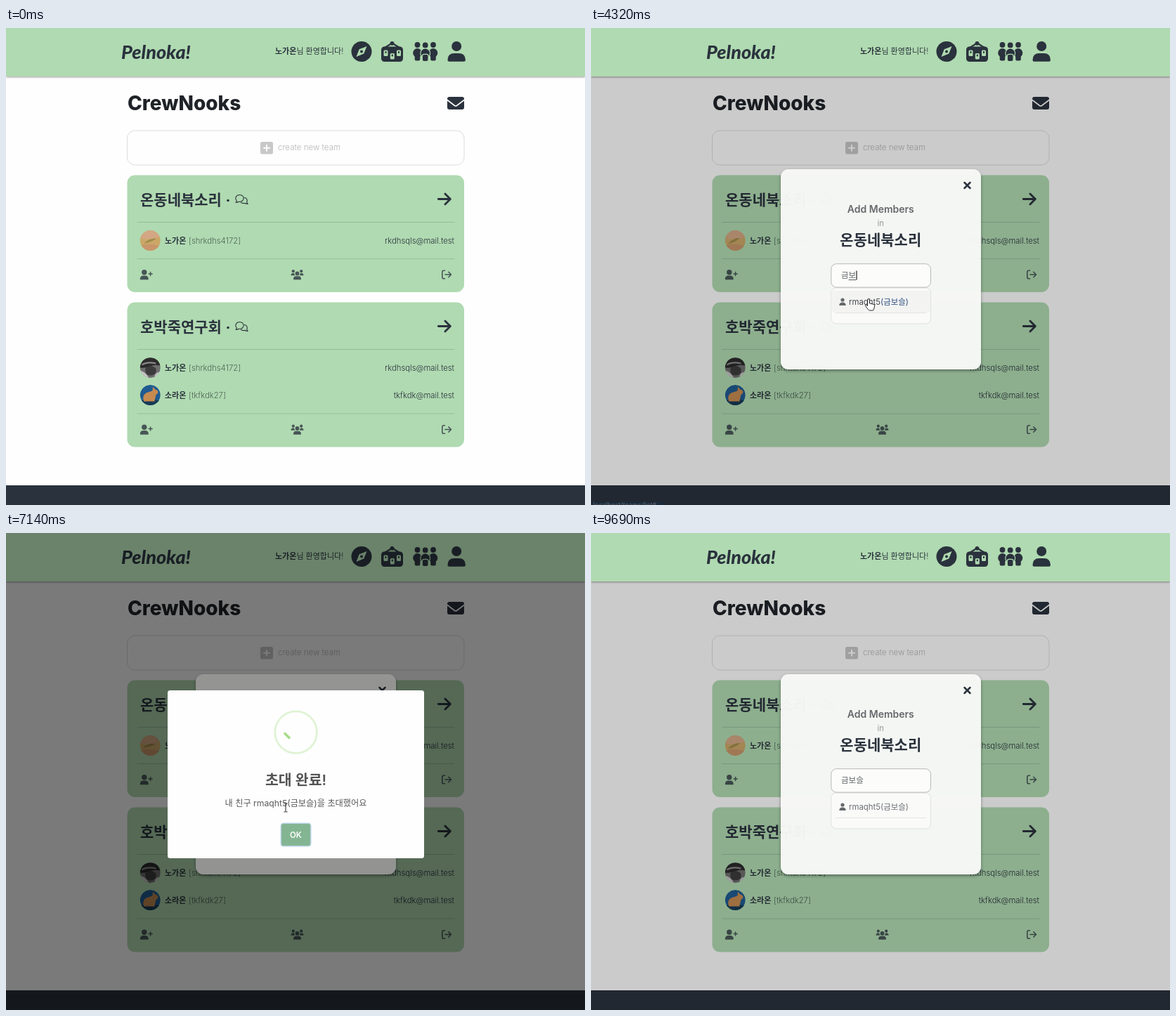
Animation of 824 by 679 pixels, one loop 9.81 s. Source, as an HTML page:

```html
<!DOCTYPE html>
<html lang="ko">
<head>
<meta charset="utf-8">
<style>
  html, body { margin: 0; width: 100%; height: 100%; overflow: hidden; background: #fefefe; }
  svg { display: block; width: 100vw; height: 100vh; }
  text { font-family: Inter, "Noto Sans CJK KR", "Noto Sans CJK", sans-serif; white-space: pre; }
  .line { fill: none; stroke-linecap: round; stroke-linejoin: round; }
</style>
</head>
<body>
<svg id="stage" viewBox="0 0 824 679"></svg>
<script>
const LOOP = 9810;
const DARK = '#2a323d', GREEN = '#b0dab1', GREY = '#6b6e74';
const me = '노가온', friend = '금보슬', friendId = 'rmaqht5', team = '온동네북소리';

const text = (x, y, size, weight, fill, content, anchor = 'start') =>
  `<text x="${x}" y="${y}" font-size="${size}" font-weight="${weight}" fill="${fill}" text-anchor="${anchor}">${content}</text>`;
const rect = (x, y, w, h, r, attrs) =>
  `<rect x="${x}" y="${y}" width="${w}" height="${h}" rx="${r}" ${attrs}/>`;
const line = (d, color, width, extra = '') =>
  `<path class="line" d="${d}" stroke="${color}" stroke-width="${width}" ${extra}/>`;
const use = (id, x, y) => `<use href="#${id}" x="${x}" y="${y}"/>`;

const defs = `<defs>
  <filter id="shadow" x="-20%" y="-20%" width="140%" height="150%">
    <feDropShadow dx="0" dy="2" stdDeviation="2" flood-opacity=".4"/>
  </filter>
  <filter id="thinShadow" x="-5%" y="-20%" width="110%" height="150%">
    <feDropShadow dx="0" dy="1" stdDeviation="1.4" flood-opacity=".4"/>
  </filter>
  <clipPath id="disc"><circle r="14.5"/></clipPath>
  <g id="chat">
    ${line('M.4 11.3q1.2-1 1.5-2.5a5.7 4.9 0 1 1 3 1.4q-1.8 1.2-4.5 1.1z', DARK, 1.1)}
    ${line('M12.8 4.3a5 4.6 0 0 1 3.4 6.6q.3 1.5 1.5 2.5q-2.4.2-4.4-1.1q-3.4.9-5.4-1', DARK, 1.1)}
  </g>
  <g id="arrowRight">${line('M1.8 8.5h17M11.4 1l7.5 7.5-7.5 7.5', DARK, 2.8)}</g>
  <g id="userPlus" fill="${DARK}" opacity=".78">
    <circle cx="6" cy="3.7" r="3.7"/>
    <path d="M0 13.5q0-5 5-5h2q5 0 5 5q0 .7-.7.7H.7q-.7 0-.7-.7z"/>
    ${line('M14.8 3.5v5M12.3 6h5', DARK, 1.5)}
  </g>
  <g id="users" fill="${DARK}" opacity=".78">
    <circle cx="3.3" cy="2.2" r="2.1"/><circle cx="14.7" cy="2.2" r="2.1"/><circle cx="9" cy="5.4" r="2.9"/>
    <path d="M0 8.3q0-3.3 3-3.3h1.6q.3 2.2 1.4 3.3zM18 8.3q0-3.3-3-3.3h-1.6q-.3 2.2-1.4 3.3zM3.5 13.5q0-4.3 4-4.3h3q4 0 4 4.3q0 .7-.7.7H4.2q-.7 0-.7-.7z"/>
  </g>
  <g id="logout" opacity=".78">${line('M4.5.8H2.8a2 2 0 0 0-2 2v7.4a2 2 0 0 0 2 2h1.7M5 6.5h8.3M9.8 2.8l3.7 3.7-3.7 3.7', DARK, 1.6)}</g>
  <g id="fieldPhoto" clip-path="url(#disc)">
    <circle r="14.5" fill="#cba768"/>
    <path d="M-15-15h30v9q-14 6-30 3z" fill="#d3a783"/>
    <path d="M-15 7q14-4 30 1v9h-30z" fill="#c8966a"/>
    <g id="streak"><path d="M-9 4Q-1-4 9-3Q1 3-9 4z" fill="#a08c4c"/></g>
    <g id="blush"><path d="M-15-15h30v22q-9-10-17-4t-13 0z" fill="#c9785c"/><path d="M-5-1q6-5 12 2l-4 4z" fill="#5d4030"/></g>
  </g>
  <g id="greyPhoto" clip-path="url(#disc)">
    <circle r="14.5" fill="#6e6e6e"/>
    <path d="M-15 0q2-14 15-14t14 11q-8-2-14 1t-15 2z" fill="#2b2b2b"/>
    <path d="M-7 1q8-7 15 0q2 9-7 10t-8-10z" fill="#3c3c3c"/>
    <path d="M-15 4q9 2 13 11h-13zM6 12q2-6 9-6v10z" fill="#c6c6c6"/>
    <path d="M-12-4q8-5 20-2" fill="none" stroke="#8a8a8a" stroke-width="2"/>
  </g>
  <g id="bluePhoto" clip-path="url(#disc)">
    <circle r="14.5" fill="#1f5b91"/>
    <path d="M-15 8q15-3 30 0v8h-30z" fill="#173b56"/>
    <path d="M-9 9q-3-8 3-12l9-3 1-6 3 4q5 1 4 5l-3 3-2 9z" fill="#c58a50"/>
  </g>
</defs>`;

const member = (y, photo, name, id, mail) =>
  use(photo, 205.3, y) +
  text(226, y + 4, 11, 600, DARK, name) +
  text(260, y + 4, 11.3, 300, '#4d6455', `[${id}]`) +
  text(638, y + 4, 11.3, 300, DARK, mail, 'end');

function card(y, height, name, members) {
  const bottom = y + height, rule = '#8fb896';
  return rect(172.5, y, 479.5, height, 11, `fill="${GREEN}"`) +
    text(191, y + 42.5, 21, 700, DARK, name) +
    `<circle cx="316" cy="${y + 36}" r="1.8" fill="${DARK}"/>` +
    use('chat', 326.5, y + 27.5) + use('arrowRight', 613.5, y + 25.5) +
    line(`M187 ${y + 67}h451M187 ${bottom - 47.5}h451`, rule, .8) +
    members +
    use('userPlus', 190.8, bottom - 32) + use('users', 405.5, bottom - 32) + use('logout', 620, bottom - 31.5);
}

const page = rect(0, 0, 824, 679, 0, 'fill="#fefefe"') +
  text(173, 117, 28, 800, '#1f2328', 'CrewNooks') +
  rect(628, 98, 24, 18, 3, `fill="${DARK}"`) + line('M628 102.5l10.5 8q1.5 1 3 0l10.5-8', '#fefefe', 1.6) +
  rect(172.5, 146, 479.5, 49, 11, 'fill="none" stroke="#dcdcdc"') +
  rect(362, 162, 18, 17.5, 2.5, 'fill="#c8c8c8"') + line('M367 170.8h8M371 166.8v8', '#fff', 2) +
  text(387, 174, 11.5, 300, '#b4b4b4', 'create new team') +
  card(209.5, 166.5, team, member(302.5, 'fieldPhoto', me, 'shrkdhs4172', 'rkdhsqls@mail.test')) +
  card(390.5, 206, '호박죽연구회',
    member(483.5, 'greyPhoto', me, 'shrkdhs4172', 'rkdhsqls@mail.test') +
    member(522.5, 'bluePhoto', '소라온', 'tkfkdk27', 'tkfkdk@mail.test')) +
  rect(0, 651, 824, 28, 0, `fill="${DARK}"`);

const person = (x, y) =>
  `<circle cx="${x}" cy="${y - 10.5}" r="3.9"/><ellipse cx="${x}" cy="${y + 1}" rx="6.3" ry="6.5"/>` +
  rect(x - 3.8, y + 3, 7.6, 9, 2, '');
const ticket = (x, y) => rect(x, y, 6, 8.5, 1.5, `fill="${GREEN}"`) +
  rect(x + 2, y + 1.5, 2, 3, .8, `fill="${DARK}"`);
const header = `<g filter="url(#thinShadow)">${rect(0, -5, 824, 74, 0, `fill="${GREEN}"`)}</g>
  <text x="164" y="44" font-size="27" font-weight="800" font-style="italic" fill="${DARK}" style="font-family:Lato,sans-serif">Pelnoka!</text>` +
  text(383, 37, 11, 300, DARK, `<tspan font-weight="700">${me}</tspan>님 환영합니다!`) +
  `<g fill="${DARK}">
    <circle cx="506" cy="33.5" r="14.5"/>
    <path d="M513.5 26l-4.2 10.5-10.8 4.5 4.2-10.7z" fill="${GREEN}"/><circle cx="506" cy="33.5" r="2"/>
    ${rect(534, 26.5, 31, 21.5, 4.5, '')}<circle cx="549.5" cy="21.8" r="2.9"/>
    ${line('M539 28l10.5-6.5L560 28', DARK, 2.2)}
    ${ticket(537.5, 31.5)}${ticket(546.8, 36)}${ticket(556, 31.5)}
    ${person(585.5, 34.5)}${person(608, 34.5)}
    <g stroke="${GREEN}" stroke-width="2.4" paint-order="stroke">${person(596.7, 35)}</g>
    <circle cx="641.2" cy="26" r="7"/>
    <path d="M628.5 45.5q0-9.5 9.5-9.5h6.4q9.5 0 9.5 9.5q0 2.3-2.2 2.3h-21q-2.2 0-2.2-2.3z"/>
  </g>`;

const modal = `<g id="modal">
  <g filter="url(#shadow)">${rect(270, 201, 285, 285, 11, 'fill="#f9faf8" fill-opacity=".955"')}</g>
  ${line('M531.5 220l8 8M539.5 220l-8 8', DARK, 2.5)}
  <g id="form">
    ${text(412.3, 300.8, 14, 600, '#65686b', 'Add Members', 'middle')}
    ${text(412.3, 320, 11.3, 400, '#999', 'in', 'middle')}
    ${text(412.3, 346.5, 21, 700, DARK, team, 'middle')}
    <g id="results">
      <rect id="panel" x="341.8" y="408" width="141.7" rx="7" fill="#fafbf9" stroke="#dfe1df"/>
      <g id="row">
        <path id="rowHover" d="M342.3 412h140.7v27q0 4-4 4h-132.7q-4 0-4-4z" fill="#f3f4f2"/>
        ${line('M348 443.5h129', '#e4e6e4', 1)}
        <g fill="#65686b"><circle cx="358" cy="425" r="2.6"/><path d="M353.3 433q0-4.6 4.7-4.6t4.7 4.6z"/></g>
        <text x="367" y="432" font-size="11.4"><tspan id="rowId">${friendId}</tspan><tspan id="rowName">(${friend})</tspan></text>
      </g>
    </g>
    ${rect(341.8, 373.7, 141.7, 33.4, 7.5, 'fill="#fcfdfb" stroke="#b5b8b8"')}
    <text id="query" x="356" y="394.2" font-size="11.5" font-weight="300"></text>
    <path id="composing" stroke="#555" fill="none"/>
    <path id="caret" stroke="#222" stroke-width="1.2" fill="none"/>
  </g>
</g>`;

const dialog = `<g id="dialog">
  ${rect(230, 224, 365, 239, 3.5, 'fill="#fefefe"')}
  <circle cx="412.6" cy="283.7" r="29.8" fill="none" stroke="#a5dc86" stroke-opacity=".35" stroke-width="2.8"/>
  ${line('M397 285.5l9.3 9.3L430 272.5', '#a5dc86', 3.5, 'id="check" pathLength="100" stroke-dasharray="100 200"')}
  ${text(412.5, 359, 20.5, 600, '#545454', '초대 완료!', 'middle')}
  ${text(412.5, 389, 12.2, 400, '#5a5a5a', `내 친구 ${friendId}(${friend})을 초대했어요`, 'middle')}
  <g id="ok">
    ${rect(390.5, 412.5, 44, 34, 4.5, 'fill="#b8d3e4"')}
    ${rect(392, 414, 41, 31, 3, 'fill="#84b592"')}
    ${text(412.5, 433.5, 11.4, 600, '#fff', 'OK', 'middle')}
  </g>
</g>`;

const cursor = `<g id="cursor">
  <path id="arrow" d="M0 0v12.8l3-2.7 1.9 4.3 1.9-.9-1.9-4.2h4.1z" fill="#fff" stroke="#111" stroke-width=".9"/>
  <path id="hand" d="M-1.5 1a1.5 1.5 0 0 1 3 0v5l5.5 1.2q2 .5 1.6 2.6l-1 4.5q-.3 1.7-2 1.7h-4q-1.2 0-2-1.1l-4-5.2q-.6-1.4 1-1.6l1.9 1.2z" fill="#fff" stroke="#111" stroke-width=".9"/>
  <path id="beam" d="M-2.5-6h2l.5.5.5-.5h2M0-5.5v11M-2.5 6h2l.5-.5.5.5h2" fill="none" stroke="#222"/>
</g>`;

const statusBar = `<g id="status">${rect(-3, 674, 105.5, 10, 2, 'fill="#10335a"')}
  ${text(3, 682.3, 9, 500, '#fff', 'localhost/teams/list#')}</g>`;

document.getElementById('stage').innerHTML = defs + page +
  `<rect id="shade" y="69" width="824" height="610"/>` + header + modal +
  `<rect id="backdrop" width="824" height="679"/>` + dialog + statusBar + cursor;

const el = id => document.getElementById(id);
const set = (id, attrs) => { for (const k in attrs) el(id).setAttribute(k, attrs[k]); };
const show = (id, on) => { el(id).style.display = on ? '' : 'none'; };
const ramp = (t, from, to) => Math.min(1, Math.max(0, (t - from) / (to - from)));
const within = (t, from, to) => t >= from && t < to;
const latest = (steps, t) => steps.filter(s => s[0] <= t).pop();

function follow(keys, t, ease = p => p) {
  const i = keys.findIndex(k => k[0] > t);
  if (i <= 0) return (i ? keys[keys.length - 1] : keys[0]).slice(1);
  const [a, b] = [keys[i - 1], keys[i]], p = ease(ramp(t, a[0], b[0]));
  return a.slice(1).map((v, n) => v + (b[n + 1] - v) * p);
}

const pointerPath = [[30, 828, 470], [850, 200, 349], [1360, 200, 349], [1770, 387, 374], [2320, 389, 384],
  [3390, 389, 384], [4200, 395, 386], [5600, 395, 386], [6300, 396, 390], [6690, 396, 390], [6740, 398, 391],
  [7650, 398, 391], [8350, 407, 420], [8640, 407, 420], [9390, 784, 405]];
const pointerShapes = [[0, 'arrow'], [820, 'hand'], [1390, 'arrow'], [1700, 'beam'], [4130, 'hand'],
  [5700, 'arrow'], [6690, 'beam'], [8150, 'arrow']];
const typing = [[0, ''], [2430, 'ㄱ'], [2850, '그'], [3390, '금'], [3750, '금ㅂ'], [4080, '금보'],
  [4560, '금봇'], [4860, '금보스'], [5190, friend]];
const popScale = [[0, .7], [135, 1.05], [240, .95], [300, 1]];
const smooth = p => p * p * (3 - 2 * p);
const OPEN = 1030, POP = 6664, CLOSE = 8500;

function drawForm(t) {
  const query = latest(typing, t)[1], found = t >= 3390, n = query.length;
  set('form', { transform: `translate(0 ${!query ? 0 : found ? -38 : -30})` });
  show('results', query);
  show('row', found);
  set('panel', { height: found ? 51 : 35 });

  el('query').textContent = query || 'search by name or ID';
  set('query', { fill: query ? '#606468' : '#8b8e90' });
  const end = 356 + n * 10.6, focused = within(t, 2200, 6450);
  set('caret', { d: `M${end + .8} 383.5v13` });
  show('caret', focused && (t % 1060 < 530 || within(t, 4080, 4700)));
  set('composing', { d: `M${end - 10.6} 396.5h10.6` });
  show('composing', n && t < 5500);

  const hover = within(t, 4130, POP), lit = within(t, 4130, 5700);
  show('rowHover', hover);
  set('rowId', { fill: lit ? '#45474c' : GREY });
  set('rowName', { fill: lit ? '#2f4f80' : GREY });
}

function drawDialog(t) {
  const closing = ramp(t, CLOSE, CLOSE + 110), since = t - POP;
  const scale = follow(popScale, since)[0] * (1 - closing / 2);
  show('dialog', since >= 0 && closing < 1);
  set('backdrop', { opacity: .4 * ramp(since, 0, 100) * (1 - closing) });
  set('dialog', {
    opacity: ramp(since, 0, 60) * (1 - closing),
    transform: `translate(412.5 343.5) scale(${scale}) translate(-412.5 -343.5)`
  });
  const drawn = smooth(ramp(since, 400, 680));
  set('check', { 'stroke-dashoffset': 100 - 100 * drawn });
  show('check', drawn > 0);
  set('ok', { opacity: 1 - .55 * ramp(t, 8330, 8450) });
}

function draw(t) {
  const opened = ramp(t, OPEN, OPEN + 150);
  set('shade', { opacity: .2 * opened });
  set('modal', { opacity: opened });
  drawForm(t);
  drawDialog(t);

  set('streak', { transform: `rotate(${8 * Math.sin(t / 260)}) translate(${2 * Math.sin(t / 400)} 0)` });
  set('blush', { opacity: .8 * Math.exp(-(((t - 8400) / 350) ** 2)) });
  set('status', { opacity: Math.max(ramp(t, 900, 960) - ramp(t, 1420, 1500), ramp(t, 4290, 4410) - ramp(t, 6840, 6930)) });

  const [x, y] = follow(pointerPath, t, smooth), shape = latest(pointerShapes, t)[1];
  set('cursor', { transform: `translate(${x} ${y})` });
  show('cursor', within(t, 30, 9390));
  for (const id of ['arrow', 'hand', 'beam']) show(id, id === shape);
}

function tick() {
  draw(performance.now() % LOOP);
  requestAnimationFrame(tick);
}
tick();
</script>
</body>
</html>
```
